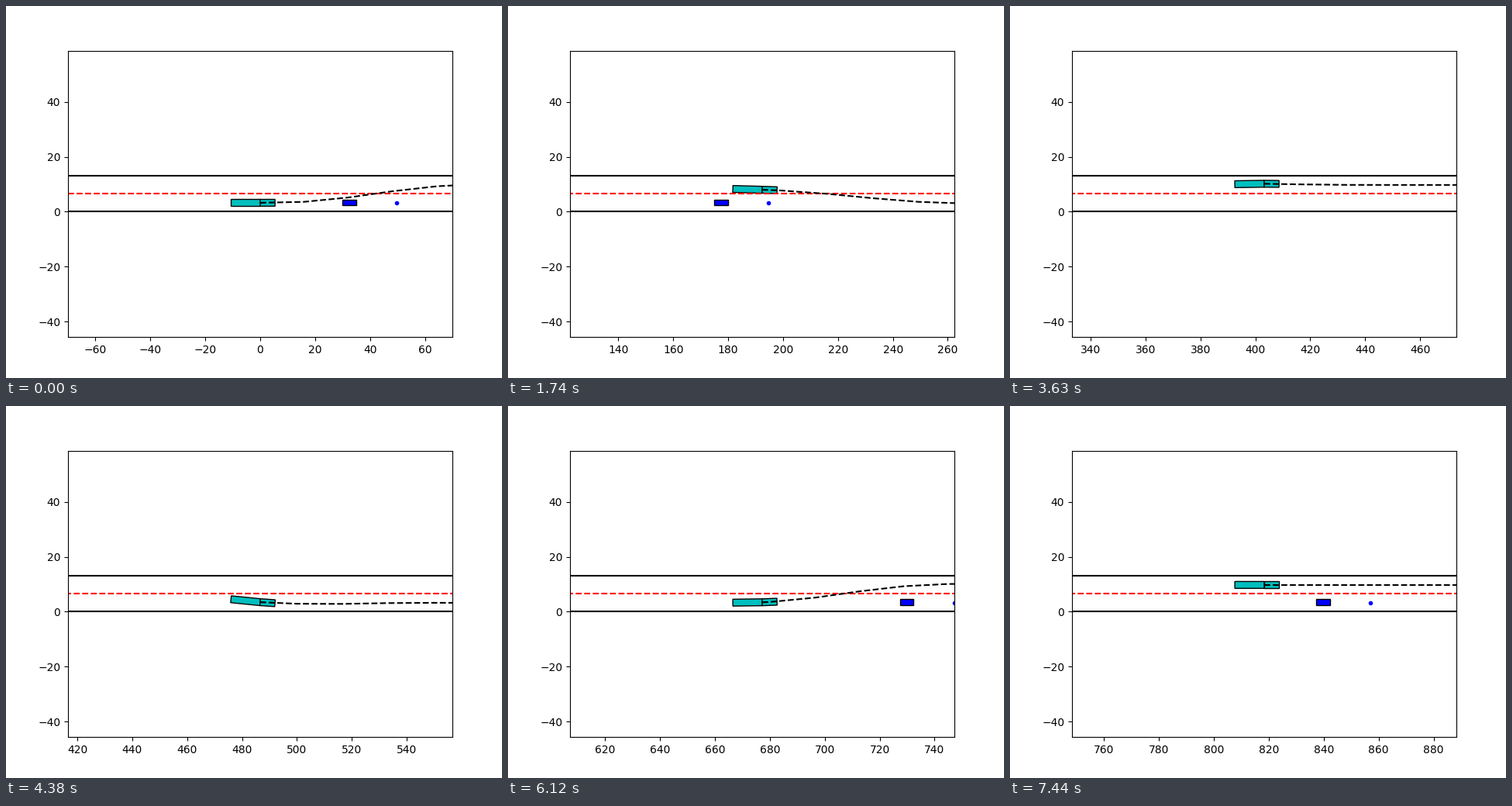
A matplotlib script for the animation above (7470 ms loop, 640x480 px).

```python
import numpy as np
import matplotlib.pyplot as plt
from matplotlib.animation import FuncAnimation

FRAMES, INTERVAL = 249, 30
LANE = 6.5
LOW = LANE / 2
TRACTOR, TRAILER, WIDTH = 5.4, 10.7, 2.5
PLAN_STEP, PLAN_POINTS = 5, 7
CAR_SPEED, SWAP = 2.5, 85

# (start, sideways shift) of every manoeuvre
MOVES = [(0, LANE), (36, -1.7), (55, 1.7 - LANE),
         (91.6, LANE), (125, -LANE), (200, LANE)]
# times and distances the truck passes
TIMES = np.array([0, 14, 28, 58, 96, 146, 204, 248, 290])
DISTS = np.array([0, 44.7, 91.25, 192.4, 319.5, 486.6, 677.2, 818.3, 952])
SPEEDS = np.gradient(DISTS, TIMES)


def path_x(t):
    """Cubic curve through the passing points."""
    i = np.clip(np.searchsorted(TIMES, t, side="right") - 1, 0, len(TIMES) - 2)
    h = TIMES[i + 1] - TIMES[i]
    u = (t - TIMES[i]) / h
    ease = u * u * (3 - 2 * u)
    return (DISTS[i] + ease * (DISTS[i + 1] - DISTS[i])
            + h * u * (1 - u) * ((1 - u) * SPEEDS[i] - u * SPEEDS[i + 1]))


def shift(s):
    """Lane change from 0 to 1 with a slight overshoot."""
    u = np.clip(s / 26, 0, 1)
    bump = 0.07 * np.exp(-((s - 28) / 6) ** 2)
    return u ** 3 * (10 - 15 * u + 6 * u * u) + bump


def path_y(t, known=FRAMES):
    """Sideways position, using only manoeuvres begun by the time known."""
    return LOW + sum(d * shift(t - start) for start, d in MOVES if start <= known)


# The tractor follows the path tangent, the trailer is towed behind it.
SUB = 10
fine = np.arange(FRAMES * SUB) / SUB
xs, ys = path_x(fine), path_y(fine)
head = np.arctan2(np.gradient(ys), np.gradient(xs))
tow = np.zeros_like(head)
for i in range(1, len(tow)):
    step = (xs[i] - xs[i - 1]) / TRAILER
    tow[i] = tow[i - 1] + np.sin(head[i - 1] - tow[i - 1]) * step


def body(x, y, angle, x0, x1, width):
    """Corners of a box along its heading, relative to (x, y)."""
    w = width / 2
    pts = np.array([(x0, -w), (x1, -w), (x1, w), (x0, w)])
    c, s = np.cos(angle), np.sin(angle)
    return pts @ np.array([(c, s), (-s, c)]) + (x, y)


def plan(n):
    """Current position followed by the points of the latest plan."""
    base = n - n % PLAN_STEP
    t = base + PLAN_STEP * np.arange(1, PLAN_POINTS + 1)
    return (np.append(path_x(n), path_x(t)),
            np.append(path_y(n), path_y(t, base)))


def car_at(n):
    start, y = (30, LOW) if n < SWAP else (217.35, 3.5)
    return start + CAR_SPEED * n, y


fig, ax = plt.subplots(figsize=(6.4, 4.8), dpi=100)
half = 70 * 369.6 / 496
ax.set_ylim(LANE - half, LANE + half)

for y, style in ((0, "k-"), (LANE, "r--"), (2 * LANE, "k-")):
    ax.plot([-70, 1200], [y, y], style)


def patch(color):
    p = plt.Polygon(np.zeros((4, 2)), facecolor=color, edgecolor="k", lw=1)
    return ax.add_patch(p)


trailer, tractor, car = patch("c"), patch("c"), patch("b")
route, = ax.plot([], [], "k--")
dot, = ax.plot([], [], "b.")


def update(n):
    i = n * SUB
    x, y = xs[i], ys[i]
    trailer.set_xy(body(x, y, tow[i], -TRAILER, 0, WIDTH))
    tractor.set_xy(body(x, y, head[i], 0, TRACTOR, WIDTH))
    cx, cy = car_at(n)
    car.set_xy(body(cx, cy, 0, 0, 5, 2))
    dot.set_data([cx + 19.75], [LOW])
    route.set_data(*plan(n))
    ax.set_xlim(x - 70, x + 70)
    return trailer, tractor, car, route, dot


anim = FuncAnimation(fig, update, frames=FRAMES, interval=INTERVAL,
                     repeat=True, repeat_delay=0, cache_frame_data=False)
plt.show()
```
